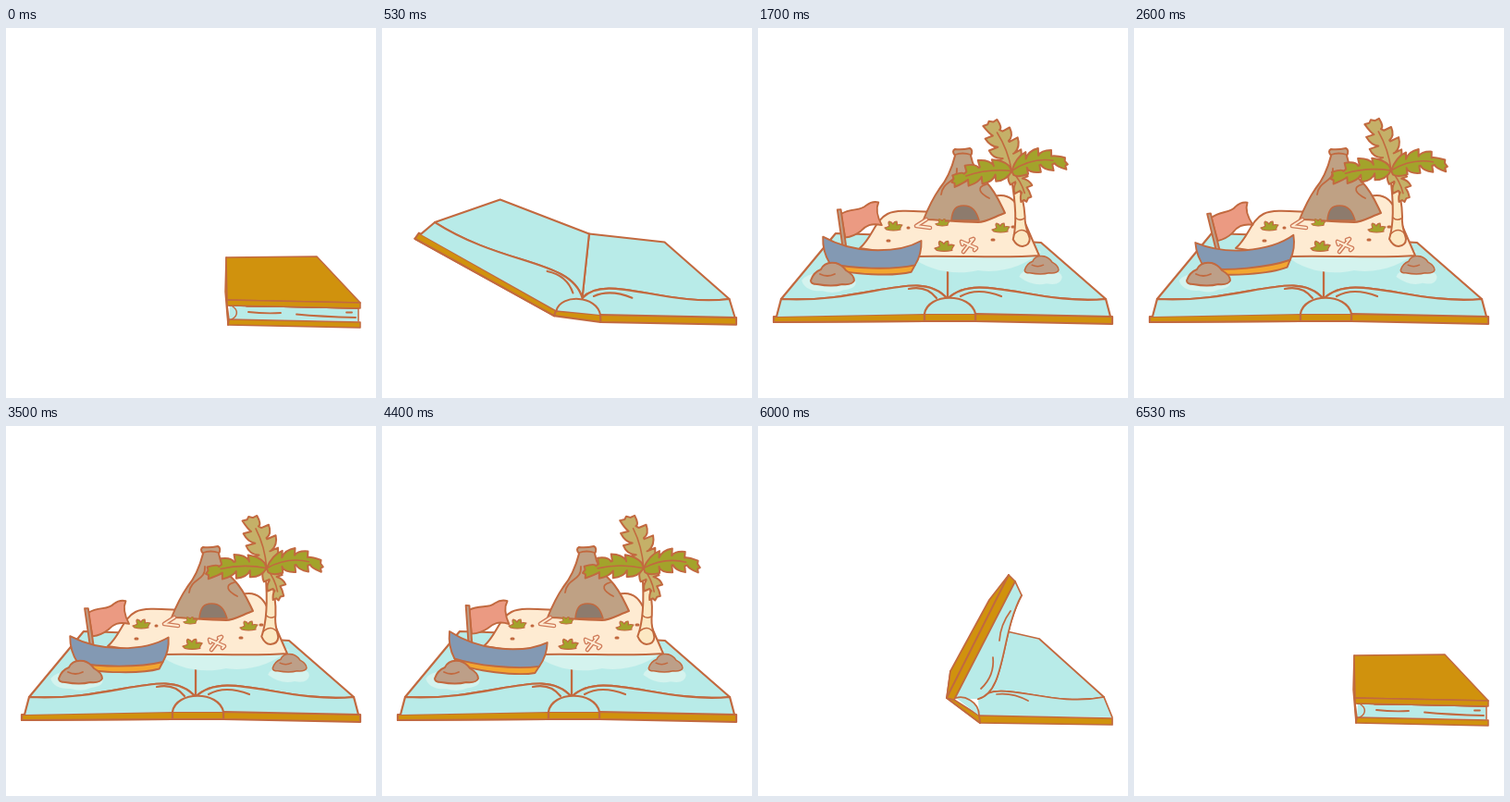
Animation, 400 px wide and 400 px high, one loop 7130 ms. Source, as an HTML page with a canvas:

```html
<!DOCTYPE html>
<html lang="en">
<head>
<meta charset="utf-8">
<title>Pop-up island book</title>
<style>
html, body { margin: 0; height: 100%; overflow: hidden; background: #fff; }
canvas { display: block; width: 100vw; height: 100vh; }
</style>
</head>
<body>
<canvas></canvas>
<script>
const LOOP = 7130;
const canvas = document.querySelector('canvas');
const g = canvas.getContext('2d');
const dpr = window.devicePixelRatio || 1;
canvas.width = canvas.height = 400 * dpr;

const LINE = '#c2693f', GOLD = '#d0920d', WATER = '#b8ebe8', FOAM = '#d4f3ee';
const SAND = '#feebd2', STONE = '#bfa184', ROCK = '#bd9f88';
const LEAF = '#a3a32b', PALE = '#c5b068', CREAM = '#fce8c3';

const clamp = v => Math.max(0, Math.min(1, v));
const mix = (a, b, u) => a + (b - a) * u;
const wave = p => (1 - Math.cos(Math.PI * clamp(p))) / 2;
const backIn = (p, s) => p * p * ((s + 1) * p - s);
const backOut = (p, s) => 1 - backIn(1 - p, s);

// Size of a prop that pops up at `from` and folds away at `to`.
function grow(t, from, to, outLen = 600, outBack = 1.7) {
  if (t < to) return backOut(clamp((t - from) / 500), 1.7);
  return Math.max(0, 1 - backIn(clamp((t - to) / outLen), outBack));
}

/* ---------- drawing helpers ---------- */
function paint(path, fill, width = 2, color = LINE) {
  if (fill) { g.fillStyle = fill; g.fill(path); }
  if (width) { g.lineWidth = width; g.strokeStyle = color; g.stroke(path); }
}
const svg = (d, fill, width, color) => paint(new Path2D(d), fill, width, color);

function poly(points, fill, width) {
  const p = new Path2D();
  points.forEach(q => p.lineTo(...q));
  p.closePath();
  paint(p, fill, width);
}
function arc3([a, b, c], width) {
  const p = new Path2D();
  p.moveTo(...a);
  p.quadraticCurveTo(...b, ...c);
  paint(p, null, width);
}
function at(x, y, scale, deg, draw) {
  if (scale <= 0.01) return;
  g.save();
  g.translate(x, y);
  g.rotate(deg * Math.PI / 180);
  g.scale(scale, scale);
  g.translate(-x, -y);
  draw();
  g.restore();
}

/* ---------- book: poses are closed, half open, open ---------- */
const HINGE = [[239, 297], [206, 295], [180, 312]];
const COVER = {
  tip: [[383, 297], [271, 161], [17, 318]],
  tipIn: [[383, 303], [278, 168], [17, 312]],
  hingeIn: [[239, 300], [212, 296], [180, 309]],
  hinge: [[239, 294], [204, 294], [180, 317]],
  hingeBack: [[238, 248], [208, 265], [190, 240]],
  tipBack: [[336, 247], [250, 188], [95, 228]]
};
const LEFT = {
  base: [[245, 301], [212, 295], [181, 309]],
  low: [[381, 301], [278, 168], [20, 312]],
  top: [[381, 303], [285, 183], [25, 293]],
  back: [[330, 290], [272, 205], [84, 222]],
  fold: [[250, 285], [262, 240], [205, 226]],
  gutter: [[242, 300], [238, 295], [205, 293]],
  c1: [[290, 301], [268, 288], [175, 258]],
  c2: [[330, 302], [262, 225], [120, 298]],
  m1: [[300, 301], [254, 250], [163, 282]],
  m2: [[280, 301], [256, 270], [182, 278]],
  m3: [[260, 301], [241, 284], [193, 292]],
  n1: [[360, 302], [273, 200], [60, 290]],
  n2: [[345, 302], [262, 215], [80, 290]],
  n3: [[330, 302], [261, 232], [100, 290]]
};
const RIGHT = {
  base: [[241, 315], [239, 313], [235, 309]],
  low: [[381, 317], [383, 315], [381, 312]],
  top: [[381, 303], [374, 293], [376, 293]],
  back: [[334, 252], [304, 230], [306, 232]],
  fold: [[245, 252], [269, 222], [205, 226]],
  gutter: [[242, 300], [238, 295], [205, 293]],
  c1: [[290, 301], [262, 272], [235, 262]],
  c2: [[330, 302], [315, 305], [300, 300]],
  m1: [[262, 307], [258, 290], [219, 290]],
  m2: [[280, 308], [275, 288], [237, 280]],
  m3: [[297, 308], [292, 297], [263, 290]]
};
const SPINE = {
  a: [[245, 301], [214, 294], [180, 309]],
  b: [[251, 305], [222, 291], [184, 286]],
  c: [[251, 311], [239, 297], [230, 286]],
  d: [[244, 315], [239, 313], [235, 309]],
  foot: [[240, 321], [240, 321], [235, 317]],
  side: [[237, 285], [205, 292], [180, 316]],
  edge: [[383, 318], [383, 316], [383, 312]],
  edgeLow: [[383, 324], [383, 323], [383, 320]]
};

// Blend one part's points; swinging points turn around the hinge.
function posed(part, angle, swing) {
  const i = angle <= 63 ? 0 : 1;
  const u = i ? (angle - 63) / 117 : angle / 63;
  const line = (p, q) => [mix(p[0], q[0], u), mix(p[1], q[1], u)];
  const h = line(HINGE[i], HINGE[i + 1]);
  const polar = (p, o) => {
    const x = p[0] - o[0], y = o[1] - p[1], a = Math.atan2(y, x);
    return [Math.hypot(x, y), a < -Math.PI / 2 ? a + 2 * Math.PI : a];
  };
  const bump = i ? 1 + 0.1 * Math.sin(Math.PI * clamp(u)) : 1;
  const out = {};
  for (const key in part) {
    const p = part[key][i], q = part[key][i + 1];
    const [r1, a1] = polar(p, HINGE[i]), [r2, a2] = polar(q, HINGE[i + 1]);
    if (swing && r1 > 20 && r2 > 20) {
      const r = mix(r1, r2, u) * bump, a = mix(a1, a2, u);
      out[key] = [h[0] + r * Math.cos(a), h[1] - r * Math.sin(a)];
    } else out[key] = line(p, q);
  }
  return out;
}

function page(p, width) {
  const curve = path => path.bezierCurveTo(...p.c1, ...p.c2, ...p.top);
  const face = new Path2D();
  face.moveTo(...p.gutter);
  curve(face);
  face.lineTo(...p.back);
  face.lineTo(...p.fold);
  face.closePath();
  paint(face, WATER, width);
  const front = new Path2D();
  front.moveTo(...p.gutter);
  curve(front);
  front.lineTo(...p.low);
  front.lineTo(...p.base);
  front.closePath();
  paint(front, WATER, 0);
  const rim = new Path2D();
  rim.moveTo(...p.gutter);
  curve(rim);
  rim.lineTo(...p.low);
  paint(rim, null, width);
}

function book(angle) {
  const w = mix(1.5, 2.2, clamp(angle / 180));
  const c = posed(COVER, angle, true), l = posed(LEFT, angle, true);
  const r = posed(RIGHT, angle), s = posed(SPINE, angle);
  r.gutter = l.gutter;
  if (angle > 75) r.fold = l.fold;
  const cover = () => {
    poly([c.tip, c.hinge, c.hingeBack, c.tipBack], GOLD, w);
    poly([c.tip, c.tipIn, c.hingeIn, c.hinge], GOLD, w);
  };
  if (angle > 75) cover();
  page(r, w);
  if (angle > 8) arc3([r.m1, r.m2, r.m3], w);
  page(l, w);
  arc3([l.m1, l.m2, l.m3], w);
  if (angle < 120) arc3([l.n1, l.n2, l.n3], w);
  poly([r.base, s.edge, s.edgeLow, s.foot], GOLD, w);
  if (angle < 75) poly([c.hingeBack, c.hinge, s.foot, s.side], GOLD, w);
  poly([c.hinge, c.hingeIn, r.base, s.foot], GOLD, w);
  svg(`M${s.a} C${s.b} ${s.c} ${s.d}`, WATER, w);
  if (angle <= 75) cover();
  if (angle < 8)
    svg('M262 307 Q280 309 297 308 M314 309.5 Q340 312 378 313 M368 307.5 H374', null, 1.8);
}

function bookAngle(t) {
  if (t < 700) return 184 * wave((t - 100) / 600);
  if (t < 5450) return 184 - 4 * wave((t - 700) / 230);
  return 180 * (1 - wave(Math.pow(clamp((t - 5450) / 1050), 0.8)));
}

/* ---------- props ---------- */
function foam(t) {
  const sway = 1 + 0.03 * Math.sin(t / 220);
  at(240, 250, grow(t, 620, 5150), 0, () =>
    svg('M165 246 C182 262 212 268 238 262 C264 266 290 256 306 242 L290 236 Z', FOAM, 0));
  at(76, 275, grow(t, 700, 5150) * sway, 0, () =>
    svg('M48 273 Q56 263 76 267 Q98 263 104 272 Q108 281 92 283 Q82 288 70 284 Q52 285 48 273Z', FOAM, 0));
  at(305, 268, grow(t, 700, 5150) * sway, 0, () =>
    svg('M283 269 Q286 259 306 263 Q328 261 328 270 Q326 279 312 276 Q298 280 283 269Z', FOAM, 0));
}

function island() {
  svg('M110 238 C124 226 126 208 140 201 C150 196 168 198 190 199 L255 182 C270 178 279 186 284 200 L304 246 C270 249 220 246 170 247 Z', SAND);
  svg('M140 230 h2 M253 229 h2 M275 215 h2 M162 216 h1', null, 3);
}

function volcano() {
  svg('M179 207 C183 197 187 187 196 174 C206 162 210 150 213 138 Q209 133 213 131 Q220 132 229 130 Q233 132 230 138 C232 150 237 158 247 167 C257 177 262 190 267 200 C256 204 246 210 238 210 C215 210 195 207 179 207Z', STONE);
  svg('M209 208 C210 196 214 192 222 192 C232 192 236 198 239 208 Z', '#8d7b6d', 1.5);
  svg('M213 137 Q221 134 230 137 M215 152 C216 168 200 164 198 180 M247 169 C235 172 240 179 250 184', null, 1.8);
}

function bush(x, y, w, s) {
  at(x, y, s, 0, () => {
    g.translate(x, y);
    g.scale(w / 18, w / 18);
    svg('M-9 1 Q-5 0 -4 -1 Q-6 -5 -4 -6 Q-1 -5 0 -3 Q1 -6 4 -6 Q5 -3 4 -2 Q7 -3 10 -2 Q7 2 8 3 Q0 5 -7 3 Z', LEAF, 1.2);
  });
}

function bones(x, y, s, d) {
  at(x, y, s, 0, () => {
    svg(d, null, 4.6, '#cf7a58');
    svg(d, null, 2, SAND);
  });
}

function boat(t) {
  at(90, 236, 1, -3 + Math.sin(t / 400), () => {
    svg('M88 199 C100 192 110 197 117 190 Q124 185 131 187 C127 195 130 205 134 213 C122 210 116 213 110 219 Q102 225 92 226 Z', '#eb9a82');
    svg('M84 194 L88 194 L93 238 L89 238 Z', ROCK);
  });
  svg('M75 255 L77 261 C98 268 148 268 168 262 L172 254 Z', '#f2a630');
  svg('M66 226 C82 234 100 239 122 239 C145 239 165 234 178 226 C179 238 176 247 172 254 C145 261 100 261 75 256 C69 247 66 238 66 226Z', '#8399b3');
}

// Leaf with rounded lobes on both sides of a bowed midrib.
function frond(deg, len, wide, bow, fill, n = 4) {
  const rib = u => bow * 4 * u * (1 - u);
  const half = u => wide * Math.pow(Math.sin(Math.PI * (0.2 + 0.75 * u)), 0.8);
  const p = new Path2D();
  const point = (u, v) => [u * len, rib(u) + v];
  p.moveTo(0, 0);
  for (const side of [-1, 1]) {
    for (let i = 0; i < n; i++) {
      const k = side < 0 ? i : n - 1 - i;
      const u = (k + 0.9) / (n + 0.4), v = side * half(u);
      const inner = point((k + 0.1) / n, v * 0.45), tip = point(u + 0.08, v);
      const notch = point(u + 0.07, v * 0.4);
      if (side < 0) {
        p.quadraticCurveTo(...point(u - 0.1, v * 0.95), ...tip);
        p.lineTo(...notch);
      } else {
        p.lineTo(...notch);
        p.lineTo(...tip);
        p.quadraticCurveTo(...point(u - 0.1, v * 0.95), ...inner);
      }
    }
    if (side < 0) p.lineTo(len, 0);
  }
  p.closePath();
  g.save();
  g.rotate(deg * Math.PI / 180);
  paint(p, fill);
  svg(`M0 0 Q${len * 0.38} ${bow * 1.5} ${len * 0.75} ${rib(0.75)}`, null, 1.6);
  g.restore();
}

function palm() {
  svg('M277 160 C281 190 281 212 276 228 Q280 236 286 236 Q294 235 294 228 C293 222 289 215 290 204 C290 190 287 176 282 160Z', CREAM);
  svg('M277 223 Q286 214 293 223 M280 205 Q284 209 289 206', null, 1.5);
  g.save();
  g.translate(278, 154);
  frond(67, 37, 11, -3, PALE, 3);
  frond(-112, 59, 17, 4, PALE);
  frond(172, 66, 13, 5, LEAF);
  frond(-4, 61, 13, -8, LEAF);
  g.restore();
}

function rock(x, y, s) {
  at(x, y, s, 0, () => {
    g.translate(x - 81, y - 267);
    svg('M57 273 Q60 264 68 261 Q72 252 84 254 Q91 256 95 262 Q104 267 104 273 Q102 278 91 277 Q80 280 64 277 Q57 277 57 273Z', ROCK);
    svg('M67 266 Q75 270 83 266', null, 1.8);
  });
}

function scene(t) {
  g.setTransform(canvas.width / 400, 0, 0, canvas.height / 400, 0, 0);
  g.fillStyle = '#fff';
  g.fillRect(0, 0, 400, 400);
  g.lineJoin = g.lineCap = 'round';
  book(bookAngle(t));
  if (t < 540 || t > 5750) return;

  foam(t);
  at(205, 246, grow(t, 560, 5110, 480), 0, island);
  at(222, 208, grow(t, 600, 5070, 500, 2.3), 0, volcano);
  bush(146, 215, 18, grow(t, 880, 4690));
  bush(199, 211, 14, grow(t, 700, 4950));
  bush(262, 217, 18, grow(t, 935, 4950));
  bush(201, 237, 20, grow(t, 720, 4850));
  bones(178, 213, grow(t, 985, 4600, 580), 'M182 207 L171 214 L186 216');
  bones(228, 235, grow(t, 680, 4760), 'M220 231 L236 238 M233 228 L222 242 M220 231 l1 3 M236 238 l-2 2 M233 228 l-3 1');
  const rocking = 1 + 5.5 * Math.cos((t - 980) / 3400 * 2 * Math.PI);
  at(122, 262, 0.95 * grow(t, 620, 5090, 480), rocking, () => boat(t));
  at(286, 234, grow(t, 620, 4755), 3.5 * Math.sin((t - 2600) / 1020), palm);
  rock(81, 267, grow(t, 940, 4640));
  rock(307, 257, 0.78 * grow(t, 750, 4780));
}

const start = performance.now();
(function tick() {
  scene((performance.now() - start) % LOOP);
  requestAnimationFrame(tick);
})();
</script>
</body>
</html>
```
